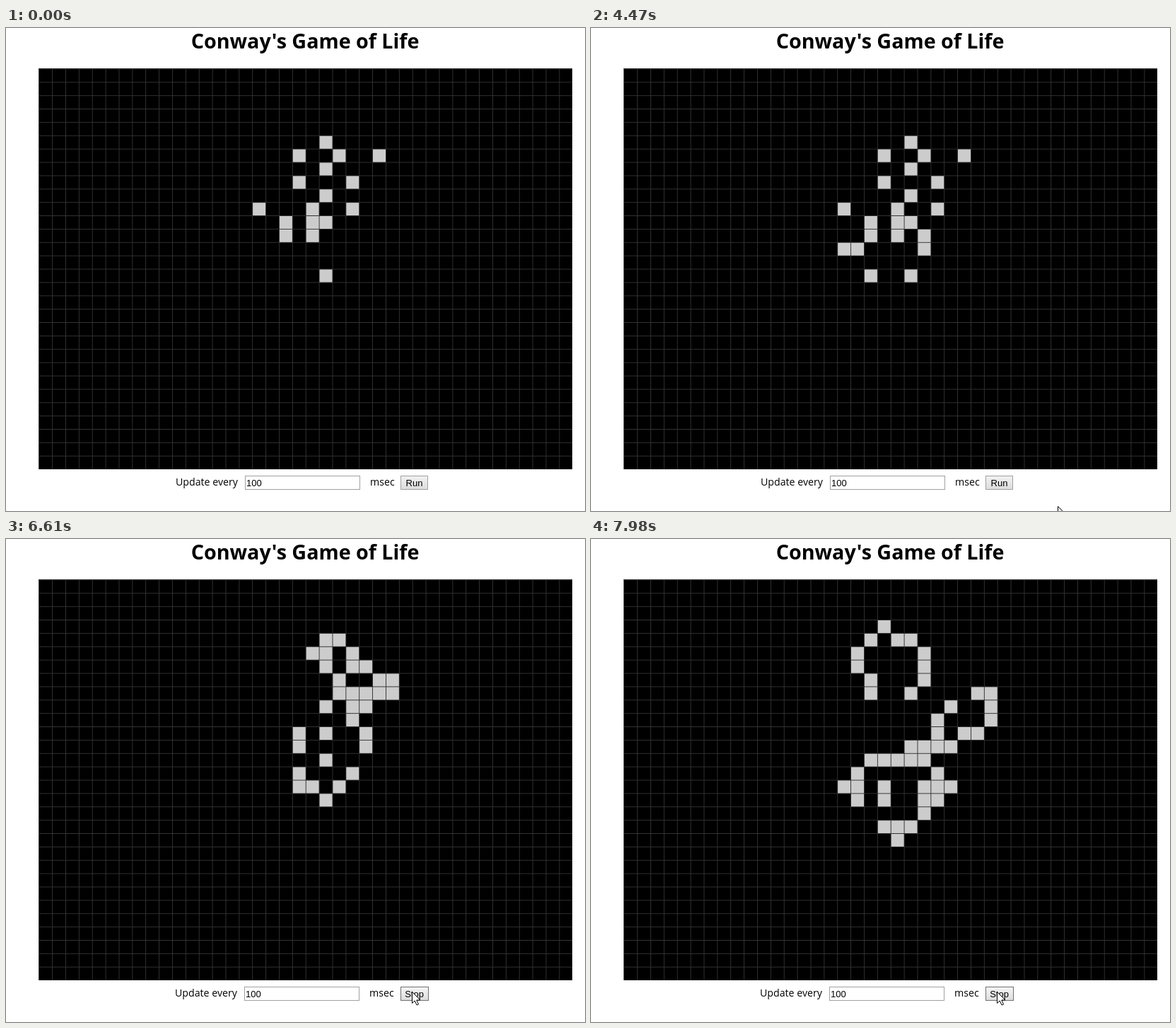
These frames come from a looping animation (819x683 px, 8000 ms). An HTML page with a canvas:

```html
<!DOCTYPE html>
<html lang="en">
<head>
<meta charset="utf-8">
<title>Conway's Game of Life</title>
<style>
  html, body { margin: 0; width: 100%; height: 100%; overflow: hidden; background: #fff; }
  canvas { display: block; }
</style>
</head>
<body>
<canvas id="stage" width="819" height="683"></canvas>
<script>
const ctx = document.getElementById('stage').getContext('2d');
const LOOP = 8000, COLS = 40, ROWS = 30, CELL = 20;
const RUN_AT = 5160, GENERATION_MS = 108.3;

// The board is painted at 20 px per cell, then scaled down onto the page
const board = document.createElement('canvas');
board.width = COLS * CELL;
board.height = ROWS * CELL;
const boardCtx = board.getContext('2d');

// '#' is alive from the start, a digit is a cell switched on by that click
const PATTERN_COL = 16, PATTERN_ROW = 5;
const pattern = `
.....#....
...#..#..#
.....#....
...#...#..
.....#....
#...#..#..
..#.##....
..#.#.5...
32....4...
..........
..1..#....`.trim().split('\n');
const clickTimes = [1100, 1700, 2140, 2770, 3370];

// Each pointer move starts where the last one ended; "via" bends its path
const moves = [
  { start: 250, end: 300, to: [383, 433] },
  { start: 500, end: 1260, via: [365, 312], to: [391, 337] },
  { start: 1310, end: 2070, via: [310, 270], to: [352, 312] },
  { start: 2140, end: 2840, via: [597, 374], to: [469, 312] },
  { start: 2970, end: 3220, to: [474, 279] },
  { start: 3370, end: 3660, to: [572, 571] },
  { start: 3860, end: 4160, to: [660, 676] },
  { start: 4470, end: RUN_AT, to: [574, 640] }
];
const pointerEntry = [438, 480], POINTER_STEP = 70;

function cellsBeforeRun(t) {
  const cells = Array(COLS * ROWS).fill(false);
  pattern.forEach((line, r) => [...line].forEach((mark, c) => {
    cells[(PATTERN_ROW + r) * COLS + PATTERN_COL + c] = mark === '#' || t >= clickTimes[mark - 1];
  }));
  return cells;
}

function nextGeneration(cells) {
  const alive = (c, r) => c >= 0 && c < COLS && r >= 0 && r < ROWS && cells[r * COLS + c];
  return cells.map((on, i) => {
    const c = i % COLS, r = Math.floor(i / COLS);
    let block = 0;
    for (let dr = -1; dr <= 1; dr++)
      for (let dc = -1; dc <= 1; dc++) block += alive(c + dc, r + dr) ? 1 : 0;
    return block === 3 || (on && block === 4);
  });
}

const generations = [cellsBeforeRun(LOOP)];
while (RUN_AT + (generations.length - 1) * GENERATION_MS < LOOP)
  generations.push(nextGeneration(generations.at(-1)));

function pointerAt(t) {
  const index = moves.findLastIndex(move => t >= move.start);
  if (index < 0) return null;
  const { start, end, via, to } = moves[index];
  const from = index ? moves[index - 1].to : pointerEntry;
  const stepped = Math.floor((t - start) / POINTER_STEP) * POINTER_STEP;
  const u = t >= end ? 1 : stepped / (end - start);
  return to.map((goal, k) => {
    const bend = via ? via[k] : (from[k] + goal) / 2;
    return Math.round((1 - u) ** 2 * from[k] + 2 * u * (1 - u) * bend + u * u * goal);
  });
}

function text(string, x, y, font, align = 'left') {
  ctx.font = font;
  ctx.textAlign = align;
  ctx.fillStyle = '#000';
  ctx.fillText(string, x, y);
}

function box(x, y, w, h, fill, border) {
  ctx.fillStyle = border;
  ctx.fillRect(x, y, w, h);
  ctx.fillStyle = fill;
  ctx.fillRect(x + 1, y + 1, w - 2, h - 2);
}

function drawBoard(cells) {
  boardCtx.fillStyle = '#333';
  boardCtx.fillRect(0, 0, board.width, board.height);
  cells.forEach((on, i) => {
    boardCtx.fillStyle = on ? '#ccc' : '#000';
    boardCtx.fillRect(i % COLS * CELL + 1, Math.floor(i / COLS) * CELL + 1, CELL - 1, CELL - 1);
  });
  ctx.drawImage(board, 46.2, 57.4, 755, 566.25);
}

function drawControls(running, hover) {
  const label = '14.2px "Open Sans", "Noto Sans", sans-serif';
  const control = '13px "Liberation Sans", Arial, sans-serif';
  const shift = running ? -1 : 0;
  text('Update every', 240 + shift, 647, label);
  box(338 + shift, 633, 163, 20, '#fff', '#a0a0a0');
  text('100', 340 + shift, 648, control);
  text('msec', 515 + shift, 647, label);

  const shade = ctx.createLinearGradient(0, 633, 0, 653);
  shade.addColorStop(0, hover ? '#f6f6f6' : '#f2f2f2');
  shade.addColorStop(1, '#dcdcdc');
  box(558, 633, running ? 40 : 39, 20, shade, hover ? '#707070' : '#a0a0a0');
  text(running ? 'Stop' : 'Run', 577.5, 648, control, 'center');
}

const arrow = new Path2D('M0 0V16L3.7 12.5L6.5 18.5L9 17.5L6.3 11.5H11.5Z');

function drawPointer([x, y]) {
  ctx.save();
  ctx.translate(x + .5, y + .5);
  ctx.fillStyle = '#fff';
  ctx.strokeStyle = '#000';
  ctx.fill(arrow);
  ctx.stroke(arrow);
  ctx.restore();
}

function draw(t) {
  const generation = Math.max(0, Math.floor((t - RUN_AT) / GENERATION_MS) + 1);
  const pointer = pointerAt(t);
  const hover = !!pointer && pointer[0] >= 558 && pointer[0] < 598 && pointer[1] >= 633 && pointer[1] < 653;
  ctx.fillStyle = '#fff';
  ctx.fillRect(0, 0, 819, 683);
  text("Conway's Game of Life", 423, 29, 'bold 28.7px "Open Sans", "Noto Sans", sans-serif', 'center');
  drawBoard(generation ? generations[generation] : cellsBeforeRun(t));
  drawControls(generation > 0, hover);
  if (pointer) drawPointer(pointer);
}

const began = performance.now();
function tick() {
  draw((performance.now() - began) % LOOP);
  requestAnimationFrame(tick);
}
tick();
</script>
</body>
</html>
```
